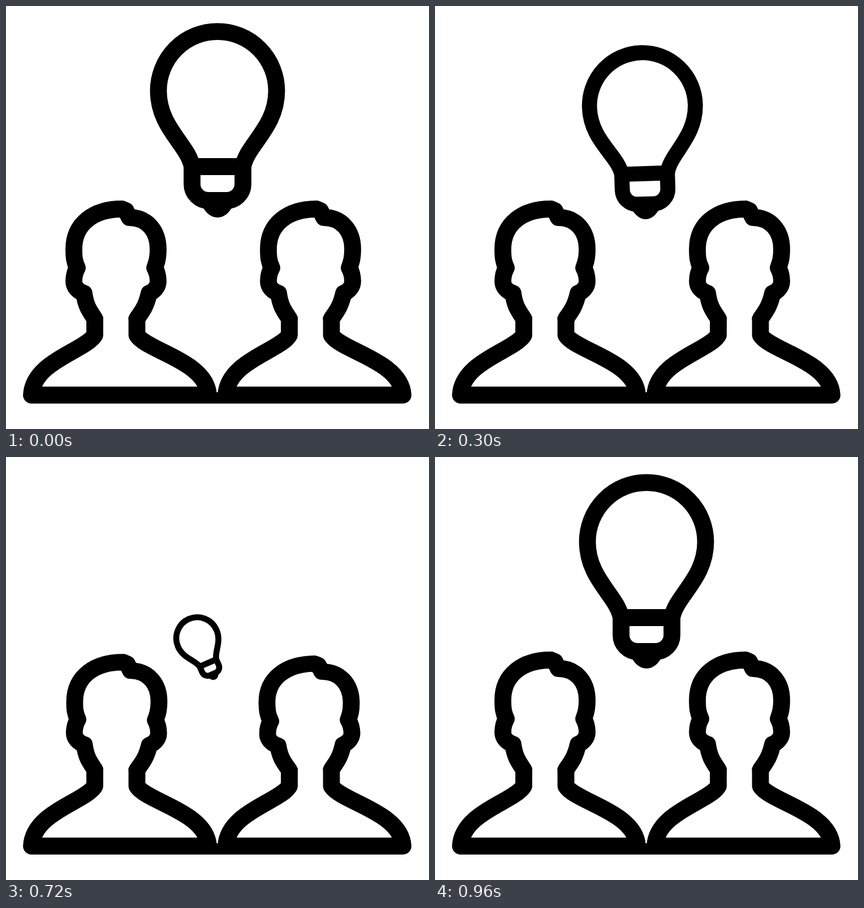
Animation of 748x748 px, one loop 1.05 s. Source, as an HTML page:

```html
<!DOCTYPE html>
<html lang="en">
<head>
<meta charset="utf-8">
<title>Shared idea</title>
<style>
  html, body { margin: 0; height: 100%; overflow: hidden; background: #fff; }
  svg { display: block; width: 100%; height: 100%; }
</style>
</head>
<body>
<svg viewBox="0 0 748 748" fill="none" stroke="#000" stroke-width="29.8" stroke-linejoin="round">
  <defs>
    <path id="body" d="M157 550V582C140 610 48 628 45 688H358C355 628 249 610 231.5 582V550"/>
    <path id="head" stroke-linecap="round" d="M157 553C147 538 141 530 138 508C128 505 120 497 120 487
      C120 477 122 470 126 463C121 452 120 445 120 430C120 385 155 359 205 359L212 362L218 374
      C250 374 269 398 269 430C269 445 267 452 263 463C267 470 269 477 269 487
      C269 497 261 505 253 508C248 530 242 538 231.5 553"/>
  </defs>
  <g><use href="#body"/><use href="#head" id="left"/></g>
  <g transform="translate(344)"><use href="#body"/><use href="#head" id="right"/></g>
  <path d="M45 693H703" stroke-width="20"/>
  <g id="bulb">
    <path d="M329 284C322 245 269.5 215 269.5 150A104.5 105 0 0 1 478.5 150C478.5 215 426 245 419 284Z"/>
    <path d="M329 284V315A29 29 0 0 0 358 344H390A29 29 0 0 0 419 315V284"/>
    <path d="M347 354C353 365 362 374 374 374S395 365 401 354Z" fill="#000" stroke="none"/>
  </g>
</svg>
<script>
const LOOP = 1050, STEP = 60, LEAVE = 180, ENTER = 720;
const { sin, cos, min, max, floor, PI } = Math;
const [bulb, left, right] = ["bulb", "left", "right"].map(id => document.getElementById(id));

function setBulb(scale, angle) {
  bulb.style.display = scale > 0 ? "" : "none";
  bulb.setAttribute("transform",
    `translate(374 403) rotate(${angle}) scale(${scale}) translate(-374 -403)`);
}

// Leans and squashes a head about the top of its neck.
function nod(head, amount, side) {
  const lean = amount * side;
  head.setAttribute("transform", `translate(194 555)
    matrix(1 ${0.03 * lean} ${-0.04 * lean} ${1 - 0.066 * amount} 0 0) translate(-194 -555)`);
}

function draw(t) {
  // The motion runs in four whole steps out and four back in.
  const out = floor((t - LEAVE) / STEP);
  const back = min(4, floor((t - ENTER) / STEP));

  if (out < 0) {
    setBulb(1, 0);
  } else if (back < 0) {
    const x = min(1, out / 4);
    setBulb((1 - x ** 6) ** 7, -7.7 * cos(1.33 * (out - 1)));
  } else {
    const growth = max(0, 1 - back / 2) ** 2;
    setBulb(1 - 0.645 * growth, -23.5 * (1 - back / 4) * cos(0.9 * back));
  }

  // Both heads dip once while the bulb returns; the left one lags.
  const dip = max(0, (back + 1) / 5);
  nod(left, 1.25 * sin(PI * dip ** 1.6), 1);
  nod(right, 0.85 * sin(PI * dip), -1);
}

let start;
function tick(now) {
  start ??= now;
  draw((now - start) % LOOP);
  requestAnimationFrame(tick);
}
draw(0);
requestAnimationFrame(tick);
</script>
</body>
</html>
```
